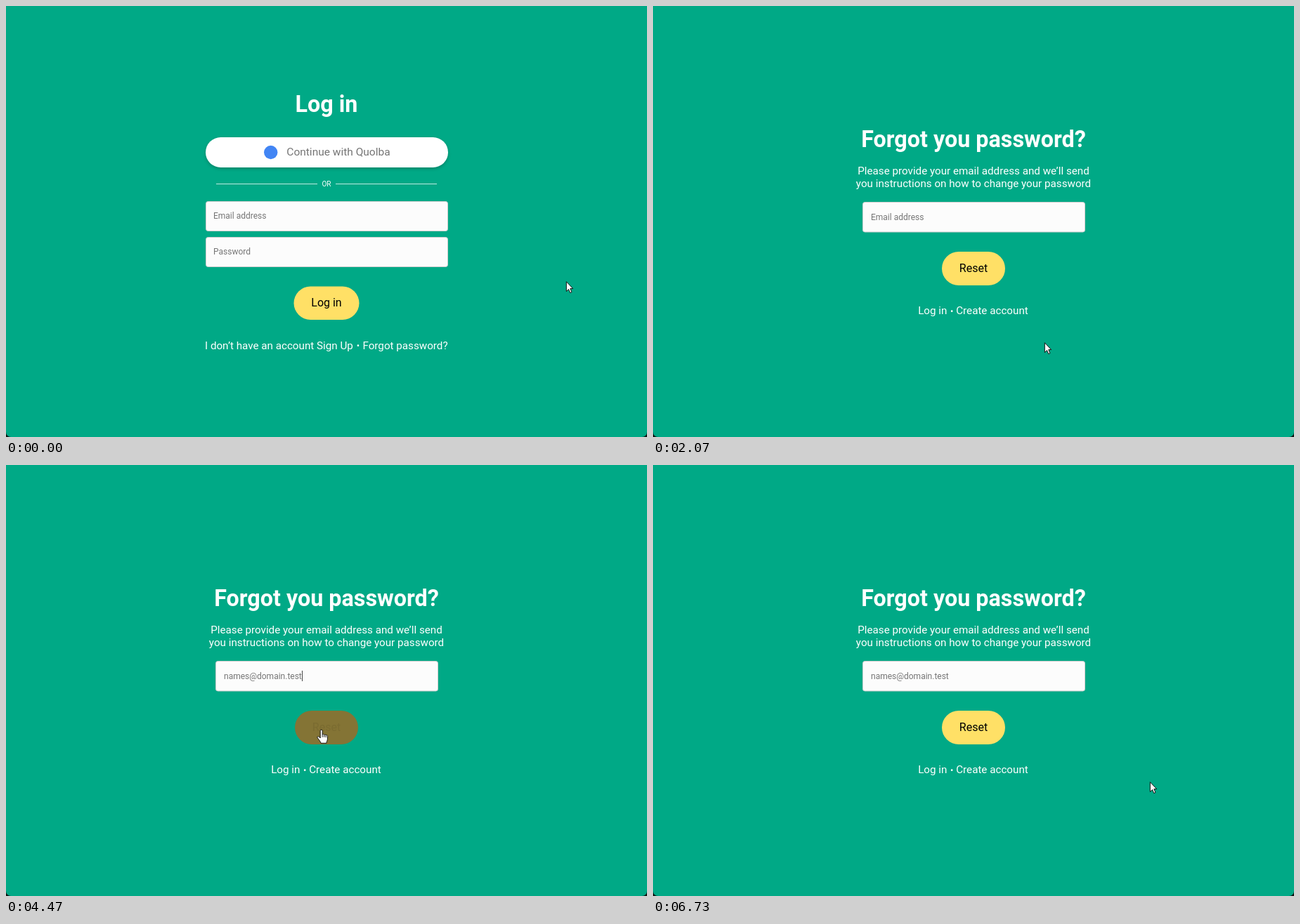
An HTML page that plays this animation: 912 px wide and 614 px high, repeating every 6.8 s.

```html
<!DOCTYPE html>
<html lang="en">
<head>
<meta charset="utf-8">
<title>Log in and reset</title>
<style>
  html, body { margin: 0; width: 100%; height: 100%; overflow: hidden; background: #101413; }
  svg { display: block; width: 912px; height: 614px; font-family: Roboto, sans-serif; }
  text { fill: #fff; white-space: pre; }
  .title { font-size: 32.3px; font-weight: 700; text-anchor: middle; }
  .body { font-size: 15.2px; }
  .mid { text-anchor: middle; }
  .dot { font-size: 13px; text-anchor: middle; }
  .button { font-size: 16px; text-anchor: middle; fill: #000; }
  .hint { font-size: 12px; fill: #757575; }
  .field { fill: #fcfcfc; stroke: #ccc; }
  .pill { fill: #ffe066; }
  .rule { stroke: #fff; stroke-opacity: .75; }
  .soft { filter: drop-shadow(0 2px 2px rgba(0, 0, 0, .22)); }
  #cursor path { fill: #fff; stroke: #111; stroke-linejoin: round; }
</style>
</head>
<body>
<svg viewBox="0 0 912 614">
  <rect y="-10" width="912" height="624" rx="7" fill="#00a986"/>

  <g id="login">
    <text class="title" x="456" y="151">Log in</text>
    <rect class="soft" x="284" y="187" width="345" height="43" rx="21.5" fill="#fff"/>
    <circle cx="376.7" cy="208.5" r="9.7" fill="#4285f4"/>
    <text x="399.3" y="213.2" font-size="15.5" style="fill:#757575">Continue with Quolba</text>
    <path class="rule" d="M299 253.5H443M469 253.5H613"/>
    <text class="mid" x="456" y="257.3" font-size="10">OR</text>
    <rect class="field" x="284.5" y="278.5" width="344" height="42" rx="3"/>
    <text class="hint" x="295" y="303">Email address</text>
    <rect class="field" x="284.5" y="329.5" width="344" height="42" rx="3"/>
    <text class="hint" x="295" y="354">Password</text>
    <rect class="pill" x="409.5" y="399.5" width="93" height="47.5" rx="23.7"/>
    <text class="button" x="456" y="428">Log in</text>
    <text class="body" x="283" y="488.5">I don’t have an account Sign Up</text>
    <text class="dot" x="501" y="488">•</text>
    <text class="body" id="forgot" x="628.6" y="488.5" text-anchor="end">Forgot password?</text>
  </g>

  <g id="reset">
    <text class="title" x="456" y="200.5">Forgot you password?</text>
    <text class="body mid" x="456" y="239.5">Please provide your email address and we’ll send</text>
    <text class="body mid" x="456" y="257.5">you instructions on how to change your password</text>
    <rect class="field" x="298.5" y="279.5" width="316" height="42.5" rx="3"/>
    <text class="hint" id="email" x="310" y="304.5">Email address</text>
    <rect id="caret" y="293" width="1" height="15" fill="#444"/>
    <rect class="pill" id="pill" x="411" y="350" width="90" height="48" rx="24"/>
    <text class="button" id="label" x="456" y="378.5">Reset</text>
    <text class="body" x="377.2" y="439">Log in</text>
    <text class="dot" x="425.3" y="438.5">•</text>
    <text class="body" x="431.2" y="439">Create account</text>
  </g>

  <g id="cursor">
    <path id="arrow" d="M.7.7V14.6L3.9 11.5 6.1 16.6 8.3 15.6 6.2 10.6H10.1Z"/>
    <path id="hand" d="M-1.6 12.2V1.9a1.5 1.5 0 0 1 3 0V7.4a1.4 1.4 0 0 1 2.5.4 1.4 1.4 0 0 1 2.4.6 1.3 1.3 0 0 1 2.3 1V14c0 2-1.3 3-1.5 5.5H-.7C-1.2 17-4.4 13.9-5.6 11.7c-.7-1.4 1-2.4 2.2-1.3ZM1.4 7.4V11M3.9 8V11M6.3 8.6V11.3"/>
    <path id="beam" style="fill:none" d="M-3.5-6.5H-1Q0-6.5 0-5.5 0-6.5 1-6.5H3.5M0-5.5V5.5M-3.5 6.5H-1Q0 6.5 0 5.5 0 6.5 1 6.5H3.5"/>
  </g>
</svg>

<script>
const TICKS = 102, RATE = 15 / 1000, FADE = 4.5;
const $ = id => document.getElementById(id);
const show = (id, on) => $(id).style.display = on ? '' : 'none';
const clamp = u => Math.min(1, Math.max(0, u));
const mix = (a, b, u) => a + (b - a) * u;

const inOut = u => u < .5 ? 4 * u ** 3 : 1 - 4 * (1 - u) ** 3;
const linear = u => u;
const square = u => u * u;

// The CSS "ease" curve, solved by bisection.
function ease(u) {
  u = clamp(u);
  let lo = 0, hi = 1, s = .5;
  const bezier = (a, b) => 3 * (1 - s) ** 2 * s * a + 3 * (1 - s) * s * s * b + s ** 3;
  for (let i = 0; i < 20; i++) {
    s = (lo + hi) / 2;
    if (bezier(.25, .25) < u) lo = s; else hi = s;
  }
  return bezier(.1, 1);
}

const hover = (n, on, off) =>
  ease((Math.min(n, off) - on) / FADE) * (1 - ease((n - off) / FADE));

const blend = (a, b, u) => `rgb(${a.map((v, i) => Math.round(mix(v, b[i], u)))})`;
const YELLOW = [255, 224, 102], BLACK = [0, 0, 0];

const moves = [
  { start: 9, end: 20, from: [796.6, 392], to: [556.6, 479], curve: inOut },
  { start: 36, end: 47, from: [556.6, 479], via: [531, 395], to: [437, 312], curve: inOut },
  { start: 62, end: 68, from: [437, 312], to: [449, 378], curve: inOut },
  { start: 85, end: 89, from: [449, 378], to: [86, 596], curve: square },
  { start: 99, end: 101, from: [306, 583], to: [706.6, 451], curve: linear },
];

function cursorAt(n) {
  const move = moves.filter(m => m.start <= n).pop() || moves[0];
  const u = move.curve(clamp((n - move.start) / (move.end - move.start)));
  return move.from.map((a, i) => {
    const b = move.to[i], c = move.via ? move.via[i] : (a + b) / 2;
    return mix(mix(a, c, u), mix(c, b, u), u);
  });
}

const within = (n, ...spans) => spans.some(([a, b]) => n >= a && n < b);

function draw(n) {
  show('login', n < 31);
  show('reset', n >= 31);
  $('forgot').style.opacity = 1 - .53 * hover(n, 17, TICKS);

  const inverted = Math.max(hover(n, 42, 42.6), hover(n, 65.72, 87.12));
  $('pill').style.fill = blend(YELLOW, BLACK, inverted);
  $('label').style.fill = blend(BLACK, YELLOW, inverted);

  const typed = n >= 51;
  $('email').textContent = typed ? 'names@domain.test' : 'Email address';
  show('caret', within(n, [47, 59], [67, 75], [83, 91]));
  $('caret').setAttribute('x', typed ? Math.round(310 + $('email').getComputedTextLength()) : 311);

  const hand = within(n, [17, 31], [42, 43], [66, 87]);
  const beam = within(n, [45, 65]);
  show('hand', hand);
  show('beam', beam);
  show('arrow', !hand && !beam);
  show('cursor', !within(n, [90, 99]));
  $('cursor').setAttribute('transform', `translate(${cursorAt(n)})`);
}

function frame() {
  const t = performance.now() % (TICKS / RATE);
  draw(Math.floor((t + 4) * RATE) % TICKS);
  requestAnimationFrame(frame);
}
frame();
</script>
</body>
</html>
```
